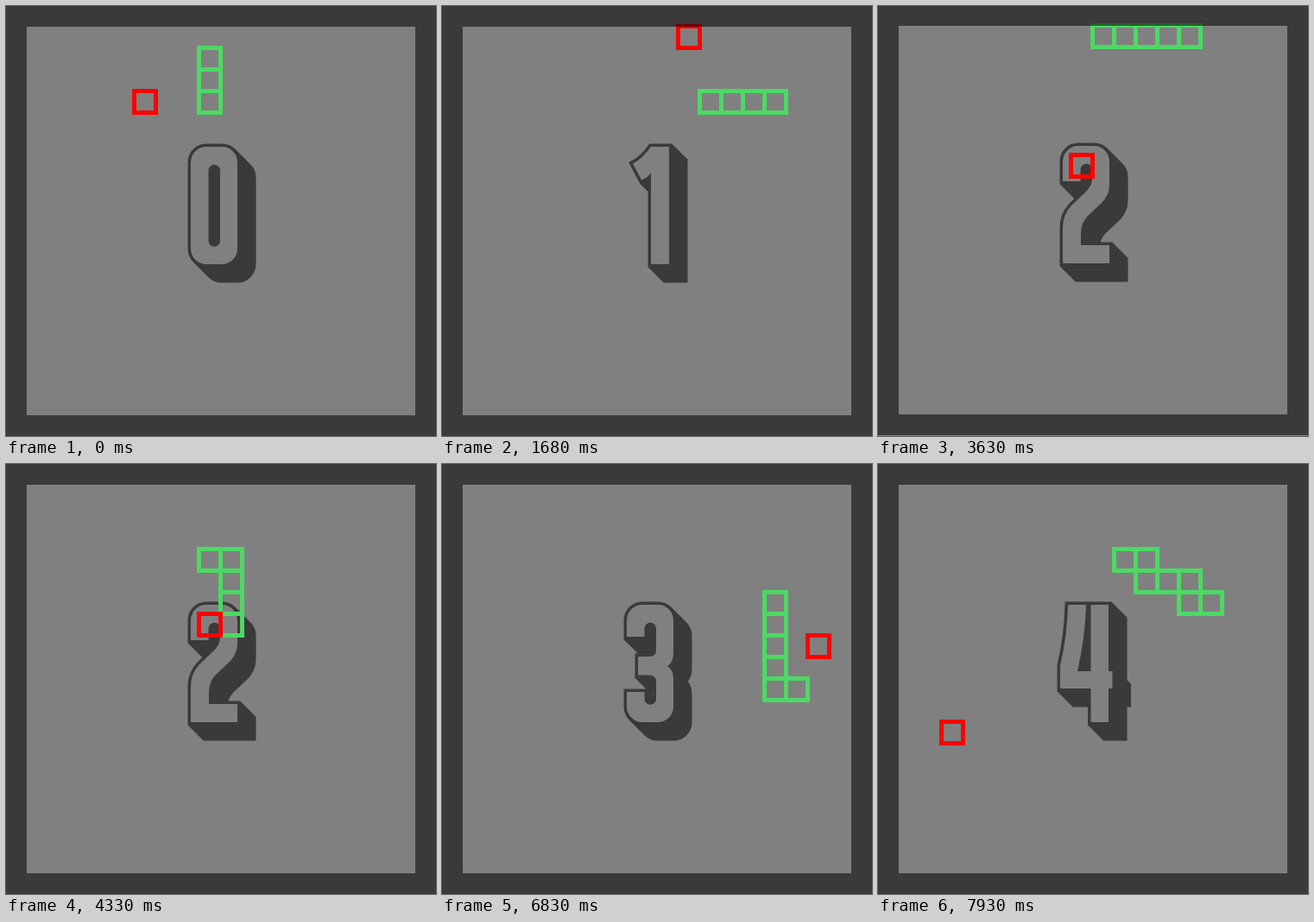
Animation of 498 by 498 pixels, one loop 8 s. Source, as an HTML page with a canvas:

```html
<!DOCTYPE html>
<html lang="en">
<head>
<meta charset="utf-8">
<title>Snake</title>
<style>
  html, body { margin: 0; height: 100%; overflow: hidden; background: #808080; }
  canvas { display: block; }
</style>
</head>
<body>
<canvas id="stage" width="498" height="498"></canvas>
<script>
const ctx = document.getElementById('stage').getContext('2d');
const LOOP = 8000, SIZE = 498, CELL = 25, START_LENGTH = 3;
const GREY = '#808080', DARK = '#3a3a3a', GREEN = '#4cd964', RED = '#ff0000';
const SHAKE_TIME = 170, SHAKE_STEP = 30;

// Route of the head: direction and number of cells
const route = 'D3 L3 U3 R3 D2 R6 U1 L5 U1 R7 U1 L8 D3 R1 D4 L3 U2 R2 D4 R1 U4 R5 D4 R2 U4 L3 U1 L2 U1 L1';
const dirs = { U: [0, -1], D: [0, 1], L: [-1, 0], R: [1, 0] };
const cells = [[8, 1]];
for (const leg of route.split(' ')) {
  const [dx, dy] = dirs[leg[0]];
  for (let i = 0; i < +leg.slice(1); i++) {
    const [x, y] = cells[cells.length - 1];
    cells.push([x + dx, y + dy]);
  }
}

// Key points of the pace, [move, ms], even in between
const pace = [[0, 30], [5, 530], [18, 1680], [32, 2930], [48, 4330], [60, 5400], [75, 6800], [83, 7630], [88, 7930]];

function moveTime(move) {
  const i = Math.max(1, pace.findIndex(([m]) => m >= move));
  const [m0, t0] = pace[i - 1], [m1, t1] = pace[i];
  return t0 + (t1 - t0) * (move - m0) / (m1 - m0);
}
const times = cells.slice(START_LENGTH - 1).map((_, move) => moveTime(move));

// A meal is the move on which the head reaches the current food
const foods = [[5, 3], [10, 0], [8, 6], [16, 7], [2, 11]];
const meals = [];
times.forEach((_, move) => {
  const head = cells[move + START_LENGTH - 1];
  if (String(head) === String(foods[meals.length])) meals.push(move);
});

// Pieces shared by the round digits
const TOP = 'V181a18 18 0 0 1 18-18h18a18 18 0 0 1 18 18';
const BOTTOM = 'V281a18 18 0 0 1-18 18h-18a18 18 0 0 1-18-18';
const SLOT_TOP = 'V190.5a6.75 6.75 0 0 0-13.5 0';
const SLOT_END = 'V272a6.75 6.75 0 0 0 13.5 0';

const digits = [
  `M214 204${TOP}${BOTTOM}ZM234.5 204${SLOT_END}${SLOT_TOP}Z`,
  'M242 163H263V299H242V193Q238 199 231 201.5L221 182.5Q232 177 242 163Z',
  `M214 204${TOP}V208Q268 220 259 229L243 244Q235 252 235 264V278H268V299H214V257` +
    `Q214 243 224 232L240 217Q248 209 248 201${SLOT_TOP}V204Z`,
  `M214 200${TOP}V219Q268 230 261 234Q268 238 268 249${BOTTOM}V264H234.5${SLOT_END}` +
    `V252Q248 244.5 240 244.5H227V223H240Q248 223 248 215${SLOT_TOP}V200Z`,
  'M220 163H241Q240 200 231 240H246.5V163H267V240H271.5V260H267V299H246.5V260H211V233Q219 200 220 163Z'
].map(d => new Path2D(d));

function drawDigit(path) {
  ctx.fillStyle = ctx.strokeStyle = DARK;
  ctx.lineWidth = 7;
  for (let k = 0; k <= 18; k += 0.5) {
    ctx.save();
    ctx.translate(k, k);
    ctx.fill(path);
    ctx.stroke(path);
    ctx.restore();
  }
  ctx.fillStyle = GREY;
  ctx.fill(path, 'evenodd');
}

function drawCell([x, y], color) {
  ctx.strokeStyle = color;
  ctx.lineWidth = 5;
  ctx.strokeRect(23.5 + x * CELL, 23.5 + y * CELL, CELL, CELL);
}

function jitter(seed) {
  const v = Math.sin(seed * 12.9898) * 43758.5453;
  return Math.round((v - Math.floor(v)) * 10 - 5);
}

function draw(t) {
  const move = Math.max(0, times.filter(time => time <= t + 0.01).length - 1);
  const score = meals.filter(m => m <= move).length;
  const end = move + START_LENGTH;

  ctx.fillStyle = GREY;
  ctx.fillRect(0, 0, SIZE, SIZE);
  ctx.save();

  // Short screen shake after each meal
  const age = score ? t - times[meals[score - 1]] : Infinity;
  if (age < SHAKE_TIME) {
    const seed = score * 20 + Math.floor(age / SHAKE_STEP);
    ctx.translate(jitter(seed), jitter(seed + 0.5));
  }

  drawDigit(digits[score]);
  for (const cell of cells.slice(end - START_LENGTH - score, end)) drawCell(cell, GREEN);
  drawCell(foods[score], RED);

  ctx.strokeStyle = 'rgba(0, 0, 0, 0.547)';
  ctx.lineWidth = 24;
  ctx.strokeRect(12, 12, SIZE - 24, SIZE - 24);
  ctx.restore();
}

const start = performance.now();
function tick() {
  draw((performance.now() - start) % LOOP);
  requestAnimationFrame(tick);
}
tick();
</script>
</body>
</html>
```
